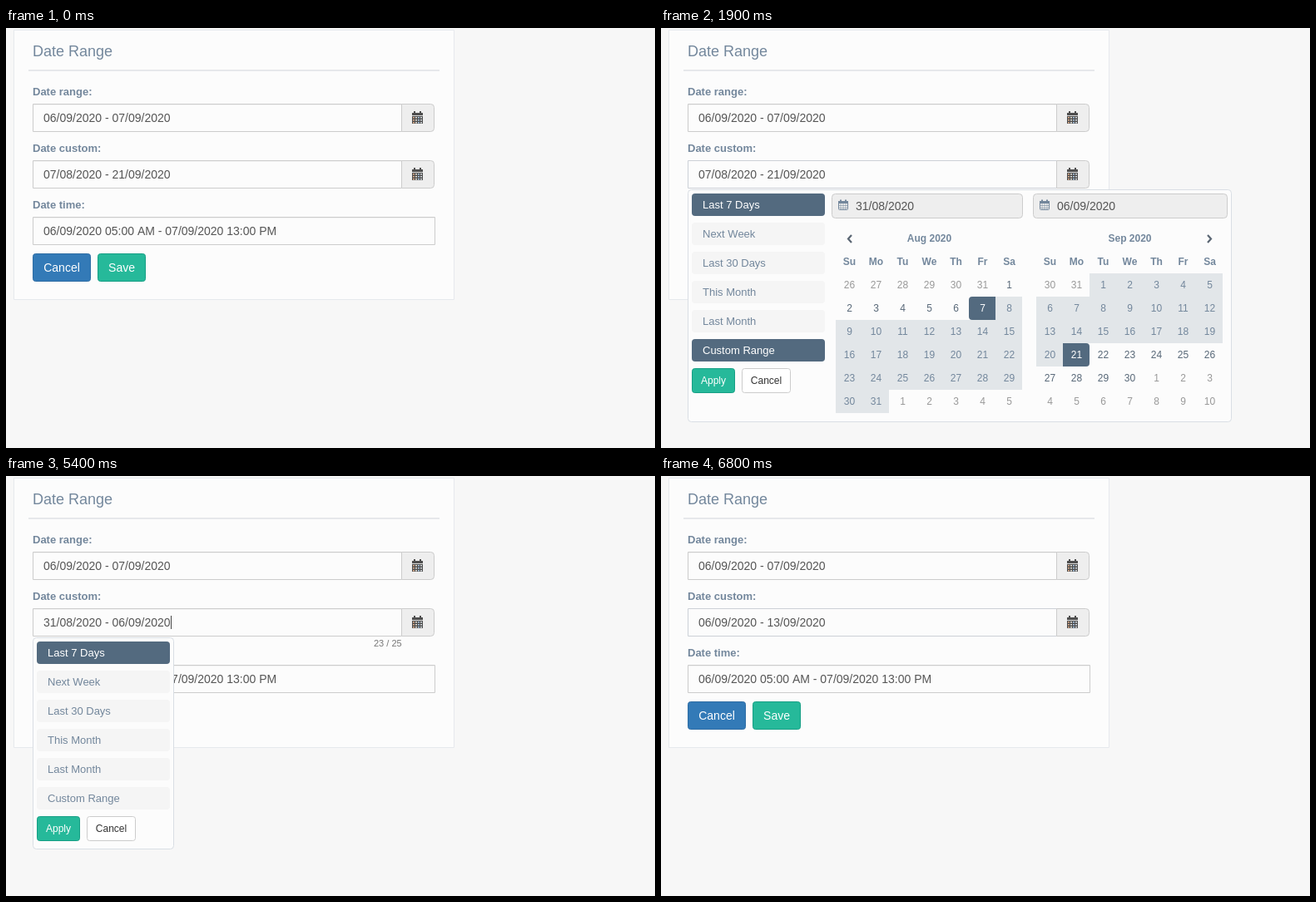
Animation of 780 by 505 pixels, one loop 8 s. Source, as an HTML page with a canvas:

```html
<!DOCTYPE html>
<html lang="en">
<head>
<meta charset="utf-8">
<title>Date Range</title>
<style>
html, body { margin: 0; width: 100%; height: 100%; overflow: hidden; background: #f7f7f7; }
canvas { display: block; width: 780px; height: 505px; }
</style>
</head>
<body>
<canvas id="stage" width="780" height="505"></canvas>
<script>
const ctx = document.getElementById('stage').getContext('2d', { alpha: false });
const LOOP = 8000;
const SLATE = '#73879c', DARK = '#536a7f', GREEN = '#26b99a';
const RANGES = ['Last 7 Days', 'Next Week', 'Last 30 Days', 'This Month', 'Last Month', 'Custom Range'];
const WEEK = ['Su', 'Mo', 'Tu', 'We', 'Th', 'Fr', 'Sa'];

function rect(x, y, w, h, color) {
  ctx.fillStyle = color;
  ctx.fillRect(x, y, w, h);
}

function box(x, y, w, h, fill, border, r = 0) {
  const inset = border ? 0.5 : 0;
  ctx.beginPath();
  ctx.roundRect(x + inset, y + inset, w - 2 * inset, h - 2 * inset, r);
  ctx.fillStyle = fill;
  ctx.fill();
  if (border) {
    ctx.strokeStyle = border;
    ctx.lineWidth = 1;
    ctx.stroke();
  }
}

function text(str, x, y, size, color, align = 'left', weight = '') {
  ctx.font = `${weight} ${size}px "Liberation Sans", Arial, sans-serif`;
  ctx.textAlign = align;
  ctx.fillStyle = color;
  ctx.fillText(str, x, y);
}

function button(label, x, y, w, h, size, fill, border, color) {
  box(x, y, w, h, fill, border, 3);
  text(label, x + w / 2, y + h / 2 + (size > 12 ? 5 : 4), size, color, 'center');
}

function field(value, y, w, focused) {
  box(32, y, w, 34, '#fcfcfc', focused ? '#ccd0d7' : '#ccc');
  if (!focused) rect(33, y + 1, w - 2, 1, '#f2f2f2');
  text(value, 45, y + 22, 14, '#555');
}

function addon(y) {
  box(475, y, 40, 34, '#eee', '#ccc', [0, 4, 4, 0]);
  rect(488, y + 11, 13, 13, '#4f4f4f');
  rect(490, y + 9, 2, 2, '#4f4f4f');
  rect(497, y + 9, 2, 2, '#4f4f4f');
  rect(488, y + 14, 13, 1, '#ddd');
  const tints = ['#dfae8c', '#e4dfd6', '#a9c6e2', '#d6dbe0'];
  for (let i = 0; i < 12; i++) {
    rect(489 + (i % 4) * 3, y + 16 + Math.floor(i / 4) * 3, 2, 1.5, tints[i % 4]);
  }
}

function form(custom, focused) {
  rect(0, 0, 780, 505, '#f7f7f7');
  box(9, 2, 530, 325, '#fcfcfc', '#e6e9ed');
  text('Date Range', 32, 34, 18, SLATE);
  rect(27, 50, 494, 2, '#e6e8eb');
  ['Date range:', 'Date custom:', 'Date time:'].forEach((s, i) =>
    text(s, 32, 81 + 68 * i, 13, SLATE, 'left', 'bold'));
  field('06/09/2020 - 07/09/2020', 91, 444, false);
  addon(91);
  field(custom, 159, 444, focused);
  addon(159);
  field('06/09/2020 05:00 AM - 07/09/2020 13:00 PM', 227, 484, false);
  button('Cancel', 32, 271, 70, 34, 14, '#337ab7', '#2e6da4', '#fff');
  button('Save', 110, 271, 58, 34, 14, GREEN, '#169f85', '#fff');
}

function popup(w, h, active) {
  box(32, 194, w, h, '#fcfcfc', '#d9dee4', 4);
  RANGES.forEach((name, i) => {
    const on = active.includes(i), y = 199 + 35 * i;
    box(37, y, 160, 27, on ? DARK : '#f5f5f5', null, 4);
    text(name, 50, y + 18, 13, on ? '#fff' : SLATE);
  });
  button('Apply', 37, 409, 52, 30, 12, GREEN, '#169f85', '#fff');
  button('Cancel', 97, 409, 59, 30, 12, '#fff', '#ccc', '#333');
}

function dateBox(x, w, value) {
  box(x, 199, w, 30, '#eee', '#ccc', 4);
  const ix = x + 8;
  box(ix, 208, 12, 11, '#eee', SLATE, 1);
  rect(ix, 208, 12, 3, SLATE);
  rect(ix + 2, 206.5, 2, 3, SLATE);
  rect(ix + 8, 206.5, 2, 3, SLATE);
  ctx.globalAlpha = 0.55;
  for (let i = 1; i < 4; i++) rect(ix + 3 * i - 0.5, 211, 1, 7, SLATE);
  for (let i = 0; i < 2; i++) rect(ix + 1, 213 + 3 * i, 10, 1, SLATE);
  ctx.globalAlpha = 1;
  text(value, x + 29, 219, 14, '#555');
}

function chevron(x, dir) {
  ctx.beginPath();
  ctx.moveTo(x - 2 * dir, 249);
  ctx.lineTo(x + 2 * dir, 253.5);
  ctx.lineTo(x - 2 * dir, 258);
  ctx.strokeStyle = '#5a6673';
  ctx.lineWidth = 2.2;
  ctx.stroke();
}

// lead: days shown from the previous month; from..to is the marked range
function month(x, title, lead, prevLen, len, from, to, picked) {
  text(title, x + 112.5, 257, 12, SLATE, 'center', 'bold');
  WEEK.forEach((d, i) => text(d, x + 16.5 + 32 * i, 285, 12, SLATE, 'center', 'bold'));
  for (let i = 0; i < 42; i++) {
    const cx = x + 32 * (i % 7), cy = 295 + 28 * Math.floor(i / 7);
    const day = i - lead + 1;
    const off = day < 1 || day > len;
    const marked = day >= from && day <= to;
    const label = day < 1 ? day + prevLen : day > len ? day - len : day;
    let color = off ? '#999' : '#586878';
    if (marked) {
      rect(cx, cy, 32, 28, '#e2e6e9');
      color = SLATE;
    }
    if (day === picked) {
      const r = from > picked ? [4, 0, 0, 4] : [0, 4, 4, 0];
      box(cx, cy, 32, 28, DARK, null, r);
      color = '#fff';
    }
    text(label, cx + 16.5, cy + 18, 12, color, 'center');
  }
}

function calendars(start, end) {
  dateBox(205, 230, start);
  dateBox(447, 234, end);
  chevron(227, -1);
  chevron(659, 1);
  month(210, 'Aug 2020', 6, 31, 31, 8, 31, 7);
  month(451, 'Sep 2020', 2, 31, 30, 1, 20, 21);
}

function draw(t) {
  const within = (a, b) => t >= a && t < b;
  const first = '07/08/2020', last = '21/09/2020';
  const start = t < 2500 ? first : t < 6800 ? '31/08/2020' : '06/09/2020';
  const end = t < 2500 ? last : t < 6800 ? '06/09/2020' : '13/09/2020';
  form(`${start} - ${end}`, within(500, 2500) || t >= 5500);

  if (within(500, 2500)) {
    const picked = t >= 1400;
    popup(654, 280, picked ? [0, 5] : [5]);
    calendars(picked ? '31/08/2020' : first, picked ? '06/09/2020' : last);
  } else if (within(5400, 6800)) {
    popup(170, 255, t >= 6100 ? [0, 1] : [0]);
    if (t < 6600) text('23 / 25', 442, 205, 11, '#777');
  }

  const caret = within(500, 900) || within(1400, 1900) ||
    within(5400, 5900) || within(6400, 6600);
  if (caret) rect(198, 168, 1, 16, '#444');
}

const origin = performance.now();
function tick() {
  draw((performance.now() - origin) % LOOP);
  requestAnimationFrame(tick);
}
tick();
</script>
</body>
</html>
```
